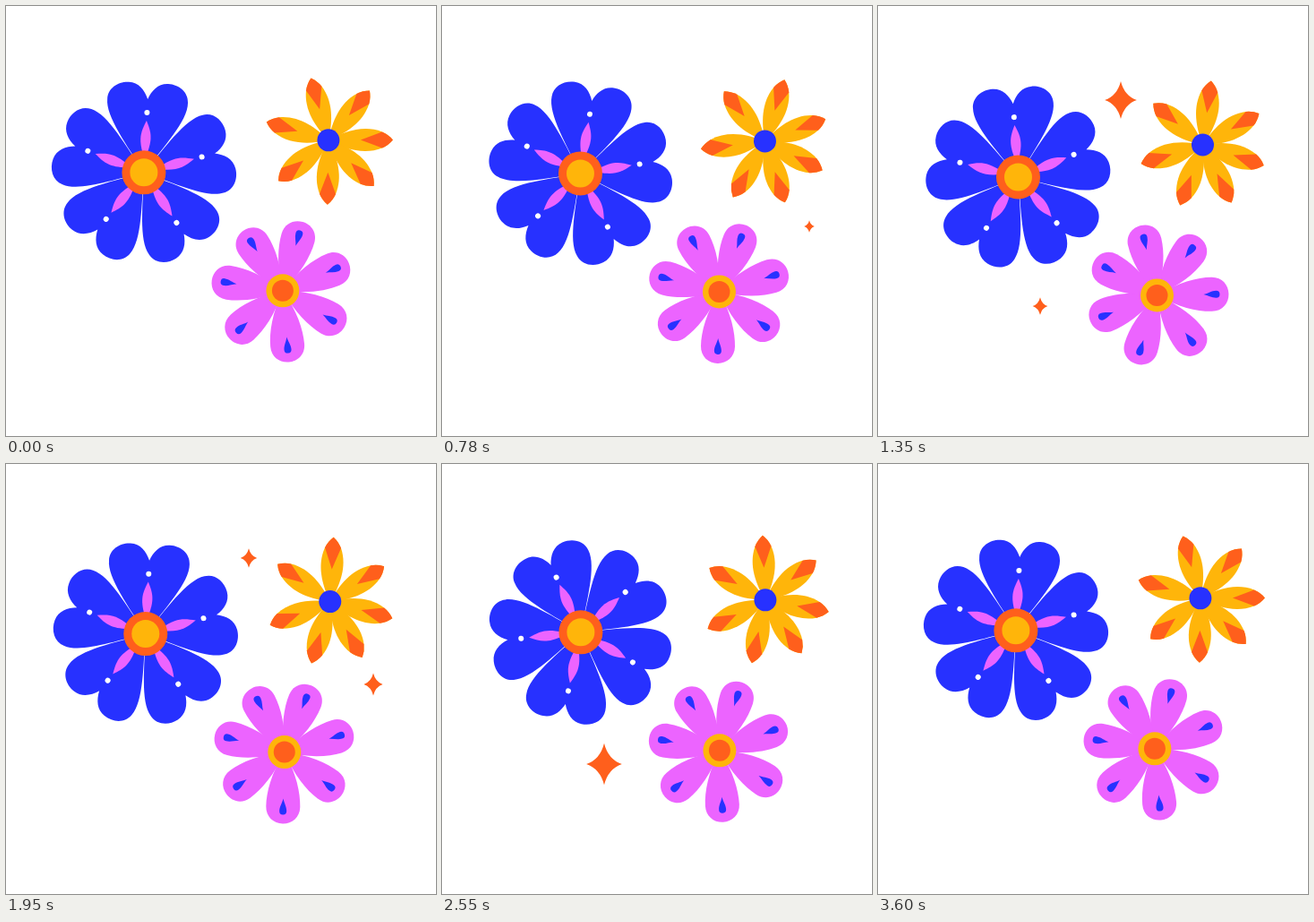
Recreate the animation shown at these times as an HTML page with a canvas. Size 480 by 480 pixels, loop 3630 ms.

```html
<!DOCTYPE html>
<html lang="en">
<head>
<meta charset="utf-8">
<title>Flowers</title>
<style>
html, body { margin: 0; width: 100%; height: 100%; overflow: hidden; background: #fff; }
canvas { display: block; width: 100vmin; height: 100vmin; }
</style>
</head>
<body>
<canvas id="stage" width="480" height="480"></canvas>
<script>
const ctx = document.getElementById('stage').getContext('2d');
const BLUE = '#2731ff', ORANGE = '#ff5f1c', YELLOW = '#ffb50a', PINK = '#ec64ff', WHITE = '#fff';
const LOOP = 3630, CYCLE = 3600, STEP = 60, TAU = Math.PI * 2;

// Petal parts point up from the flower's heart at 0,0.
const parts = {
  heart: new Path2D('M0 0C-20-29-46-60-45-80C-45-92-34-100-22-100C-11-100-4-92 0-82C4-92 11-100 22-100C34-100 45-92 45-80C46-60 20-29 0 0Z'),
  stamen: new Path2D('M-2-20C-8-38-6-45 0-58C6-45 8-38 2-20Z'),
  leaf: new Path2D('M0 0C-10-18-17-40-9-60Q-6-67 0-72Q6-67 9-60C17-40 10-18 0 0Z'),
  tip: new Path2D('M0-36L-9-60Q-6-67 0-72Q6-67 9-60Z'),
  round: new Path2D('M0 0C-14-24-19-45-19-61C-19-73-10-80 0-80C10-80 19-73 19-61C19-45 14-24 0 0Z'),
  drop: new Path2D('M0-52C-1-57-4-61-4-66A4 4 0 0 1 4-66C4-61 1-57 0-52Z'),
  dot: new Path2D('M3-67A3 3 0 1 1-3-67A3 3 0 1 1 3-67Z')
};

// The flowers swing between these moments; turns are in degrees.
const swings = [0, 780, 1320, 1920, 2520, 3060, CYCLE];

// "bunch" crowds the petals by some degrees around the direction "toward".
const flowers = [
  {
    x: 155, y: 188, petals: 5, bunch: 0, toward: 0,
    turns: [3, 9, -4, 3, -24, 2],
    layers: [['heart', BLUE], ['stamen', PINK], ['dot', WHITE]],
    discs: [[24.5, ORANGE], [15.5, YELLOW]]
  },
  {
    x: 361, y: 152, petals: 7, bunch: 7.5, toward: 45,
    turns: [-19, -40, 2, -2, -7, -19],
    layers: [['leaf', YELLOW], ['tip', ORANGE]],
    discs: [[12.5, BLUE]]
  },
  {
    x: 310, y: 320, petals: 7, bunch: 3.3, toward: 230,
    turns: [19, 25, 40, 25, 21, 17],
    layers: [['round', PINK], ['drop', BLUE]],
    discs: [[18.5, YELLOW], [12, ORANGE]]
  }
];

// Each sparkle peaks "count" times per cycle, "every" ms apart.
const sparkles = [
  { x: 271, y: 105, size: 33, first: 315, every: 900, count: 4 },
  { x: 181, y: 335, size: 26, first: 450, every: 1050, count: 3 },
  { x: 410, y: 246, size: 18, first: 960, every: 870, count: 2 }
];
const SPARKLE_FADE = 290;

const radians = degrees => degrees * TAU / 360;
const smooth = u => u * u * (3 - 2 * u);

function turnAt(turns, time) {
  const next = swings.findIndex(at => at > time);
  const from = swings[next - 1];
  const a = turns[next - 1], b = turns[next % turns.length];
  return a + (b - a) * smooth((time - from) / (swings[next] - from));
}

function driftAt(time) {
  const angle = time / CYCLE * TAU;
  return -2.2 * Math.cos(angle) - 1.5 * Math.sin(2 * angle);
}

function drawFlower({ x, y, petals, bunch, toward, turns, layers, discs }, time) {
  const turn = turnAt(turns, time), drift = driftAt(time);
  ctx.save();
  ctx.translate(x + drift / 2, y + drift);
  for (const [part, colour] of layers) {
    ctx.fillStyle = colour;
    for (let i = 0; i < petals; i++) {
      const heading = turn + i * 360 / petals;
      ctx.save();
      ctx.rotate(radians(heading + bunch * Math.cos(radians(heading - toward))));
      ctx.fill(parts[part]);
      ctx.restore();
    }
  }
  for (const [radius, colour] of discs) {
    ctx.fillStyle = colour;
    ctx.beginPath();
    ctx.arc(0, 0, radius, 0, TAU);
    ctx.fill();
  }
  ctx.restore();
}

function drawSparkle({ x, y, size, first, every, count }, time) {
  const nearest = Math.round((time - first) / every);
  const peak = first + every * Math.max(0, Math.min(count - 1, nearest));
  const scale = 1 - Math.abs(time - peak) / SPARKLE_FADE;
  if (scale <= 0) return;
  const h = size * scale, w = h * 0.85;
  ctx.fillStyle = ORANGE;
  ctx.beginPath();
  ctx.moveTo(x, y - h);
  for (let i = 0; i < 4; i++) {
    const end = i * TAU / 4, bend = end - TAU / 8;
    ctx.quadraticCurveTo(
      x + w * 0.32 * Math.cos(bend), y + h * 0.32 * Math.sin(bend),
      x + w * Math.cos(end), y + h * Math.sin(end)
    );
  }
  ctx.fill();
}

function draw(elapsed) {
  const time = Math.floor(elapsed % LOOP / STEP) * STEP % CYCLE;
  ctx.fillStyle = WHITE;
  ctx.fillRect(0, 0, 480, 480);
  flowers.forEach(flower => drawFlower(flower, time));
  sparkles.forEach(sparkle => drawSparkle(sparkle, time));
}

const start = performance.now();
function tick() {
  draw(performance.now() - start);
  requestAnimationFrame(tick);
}
tick();
</script>
</body>
</html>
```
